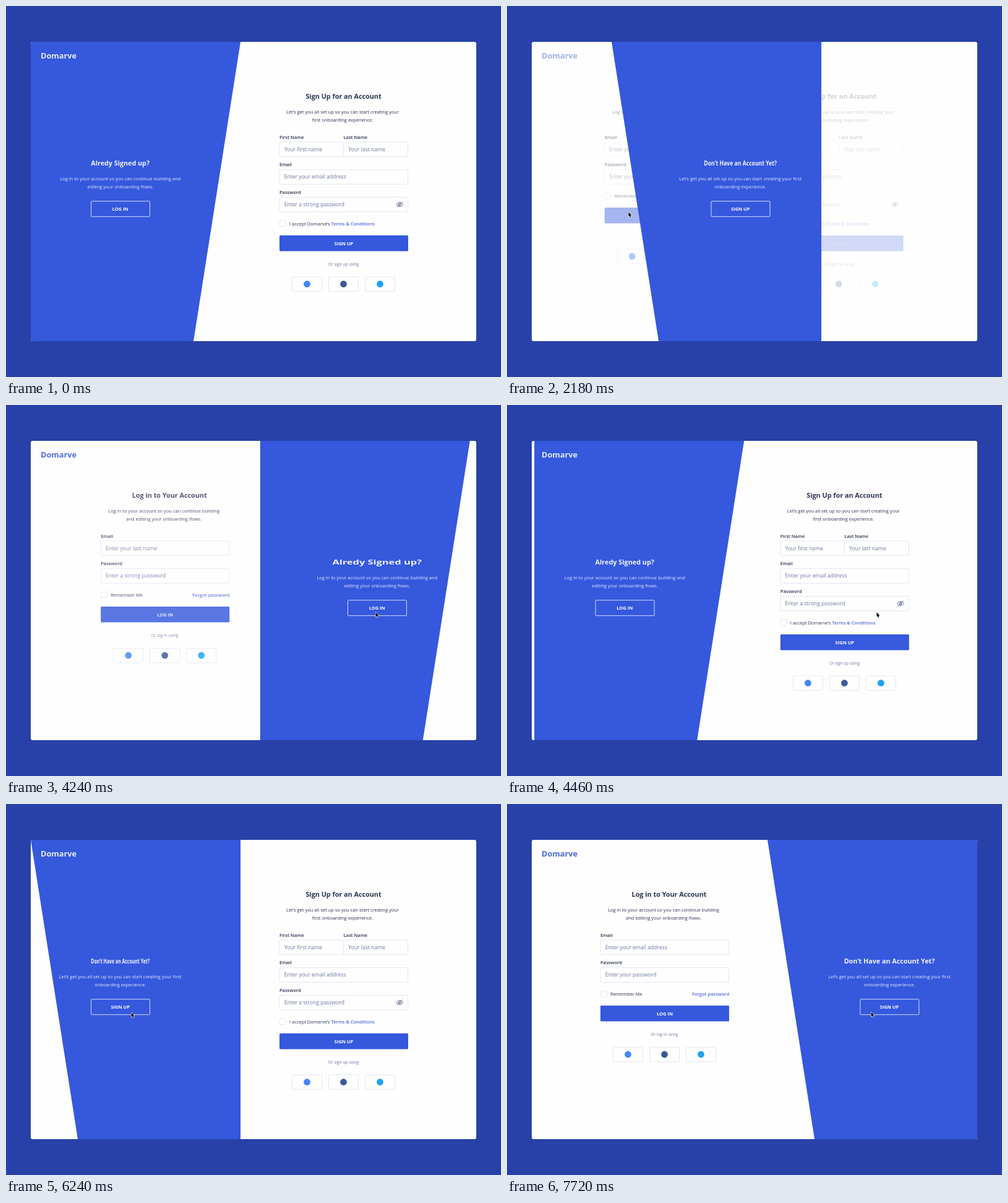
Write an HTML page with a canvas that moves like this. It is 800x600 px and loops after 8 s.

```html
<!DOCTYPE html>
<html lang="en">
<head>
<meta charset="utf-8">
<title>Sign up / log in</title>
<style>
  html, body { margin: 0; width: 100%; height: 100%; overflow: hidden; background: #2841a8; }
  canvas { display: block; width: 800px; height: 600px; }
</style>
</head>
<body>
<canvas id="stage" width="800" height="600"></canvas>
<script>
const ctx = document.getElementById('stage').getContext('2d');
const LOOP = 8000;
const BLUE = '#3558dd', INK = '#283250', HINT = '#6d779f', LINE = '#e3e6f2', LINK = '#4f69d8';
const SOCIAL = ['#4285f4', '#3b5998', '#1da1f2'];
const BRAND = 'Domarve';

// swap: content changes; go: springs start; right: panel ends on the right
const TURNS = [
  { swap: -5000, go: -5000, right: false },
  { swap: 2060, go: 2095, right: true },
  { swap: 4230, go: 4221, right: false },
  { swap: 6220, go: 6241, right: true }
];

// Pointer path: time, x, y
const PATH = [
  [240, 724, 50], [440, 560, 110], [640, 409, 189], [920, 409, 189],
  [1180, 260, 330], [1340, 205, 357], [1500, 196, 341], [1660, 196, 334],
  [1820, 196, 334], [1840, 196, 333], [2440, 196, 333], [2640, 265, 340],
  [2880, 432, 344], [3400, 597, 335], [4720, 597, 335], [5060, 466, 352],
  [5260, 272, 355], [5860, 202, 338], [5880, 202, 338], [5900, 202, 337],
  [6640, 202, 337], [7040, 430, 346], [7720, 588, 336]
];

const PANELS = {
  left: {
    shape: [[0, 0], [339, 0], [263, 484], [0, 484]],
    title: 'Alredy Signed up?',
    lines: ['Log in to your account so you can continue building and', 'editing your onboarding flows.'],
    button: 'LOG IN'
  },
  right: {
    shape: [[0, 0], [339, 0], [339, 484], [76, 484]],
    title: 'Don’t Have an Account Yet?',
    lines: ['Let’s get you all set up so you can start creating your first', 'onboarding experience.'],
    button: 'SIGN UP'
  }
};

const clamp = v => Math.max(0, Math.min(1, v));
const mix = (a, b, p) => a + (b - a) * p;

function spring(ms, tension, friction) {
  if (ms <= 0) return 0;
  const t = ms / 1000, a = friction / 2, b = Math.sqrt(tension - a * a);
  return 1 - Math.exp(-a * t) * (Math.cos(b * t) + a / b * Math.sin(b * t));
}

function font(size, weight = 400) {
  ctx.font = `${weight} ${size}px "Open Sans", "Noto Sans", sans-serif`;
}

// y is the middle of the capitals
function text(str, x, y, size, color, weight = 400, align = 'left') {
  font(size, weight);
  ctx.textAlign = align;
  ctx.fillStyle = color;
  ctx.fillText(str, x, y + size * 0.36);
}

function box(x, y, w, h, { fill, stroke, r = 1.5 }) {
  ctx.beginPath();
  ctx.roundRect(x, y, w, h, r);
  if (fill) { ctx.fillStyle = fill; ctx.fill(); }
  if (stroke) { ctx.strokeStyle = stroke; ctx.lineWidth = 1; ctx.stroke(); }
}

function field(label, hint, x, y, w = 207.5) {
  text(label, x, y - 8, 7.5, INK, 600);
  box(x, y, w, 23.5, { stroke: LINE });
  text(hint, x + 7.7, y + 11.7, 8.6, HINT);
}

function heading(title, titleX, lines, x) {
  text(title, titleX, 146, 10.8, INK, 700, 'center');
  lines.forEach((s, i) => text(s, x, 171 + i * 13.3, 7.5, INK, 400, 'center'));
}

function submit(label, x, y) {
  box(x, y, 208, 25.5, { fill: BLUE });
  text(label, x + 104, y + 13, 7.5, '#fff', 700, 'center');
}

function socials(label, x, y) {
  text(label, x + 103.5, y - 20.5, 6.5, HINT, 400, 'center');
  SOCIAL.forEach((color, i) => {
    const left = x + 20.5 + i * 59;
    box(left, y, 48, 23.5, { stroke: LINE });
    ctx.beginPath();
    ctx.arc(left + 24, y + 11.7, 5.4, 0, 7);
    ctx.fillStyle = color;
    ctx.fill();
  });
}

function eye(x, y) {
  ctx.strokeStyle = '#5c668f';
  ctx.lineWidth = 1;
  ctx.beginPath();
  ctx.moveTo(x - 5.5, y);
  ctx.quadraticCurveTo(x, y - 7, x + 5.5, y);
  ctx.quadraticCurveTo(x, y + 7, x - 5.5, y);
  ctx.moveTo(x + 1.8, y);
  ctx.arc(x, y, 1.8, 0, 7);
  ctx.moveTo(x - 4.5, y + 4.3);
  ctx.lineTo(x + 4.5, y - 4.3);
  ctx.stroke();
}

function signUpForm() {
  const x = 442;
  heading('Sign Up for an Account', 545.5,
    ['Let’s get you all set up so you can start creating your', 'first onboarding experience.'], 544);
  field('First Name', 'Your first name', x, 220, 103.5);
  field('Last Name', 'Your last name', 545.5, 220, 104);
  field('Email', 'Enter your email address', x, 264.7);
  field('Password', 'Enter a strong password', x, 309.3);
  eye(636.3, 321);
  box(x + 0.3, 346.7, 10, 10, { stroke: LINE });
  const terms = `I accept ${BRAND}’s `;
  text(terms, 458, 352, 7.5, INK);
  text('Terms & Conditions', 458 + ctx.measureText(terms).width, 352, 7.5, LINK, 600);
  submit('SIGN UP', x, 371);
  socials('Or sign up using', x, 438);
}

function logInForm(leaving) {
  const x = 151;
  heading('Log in to Your Account', 262,
    ['Log in to your account so you can continue building', 'and editing your onboarding flows.'], 253);
  field('Email', leaving ? 'Enter your last name' : 'Enter your email address', x, 220);
  field('Password', leaving ? 'Enter a strong password' : 'Enter your password', x, 264.7);
  box(x + 0.3, 302.2, 10, 10, { stroke: LINE });
  text('Remember Me', 167, 307.5, 7.5, INK);
  text('Forgot password', 359.3, 307.5, 7.5, LINK, 600, 'right');
  submit('LOG IN', x, 326);
  socials('Or log in using', x, 393.3);
}

function fade(draw, alpha, dx) {
  if (alpha <= 0) return;
  ctx.save();
  ctx.globalAlpha = alpha;
  ctx.translate(dx * (1 - alpha), 0);
  draw();
  ctx.restore();
}

function titleWidth(panel) {
  font(10.75, 700);
  return ctx.measureText(panel.title).width;
}

function drawPanel(panel, shapePos, textPos) {
  const x = 40 + 381 * shapePos;
  ctx.beginPath();
  panel.shape.forEach(([px, py]) => ctx.lineTo(x + px, 58 + py));
  ctx.fillStyle = BLUE;
  ctx.fill();

  // the title's width morphs between both captions
  const width = mix(titleWidth(PANELS.left), titleWidth(PANELS.right), textPos);
  ctx.save();
  ctx.translate(mix(184.7, 618, textPos), 0);
  ctx.save();
  ctx.scale(width / titleWidth(panel), 1);
  text(panel.title, 0, 254, 10.75, '#f1f3fd', 700, 'center');
  ctx.restore();
  panel.lines.forEach((s, i) => text(s, 0, 279.3 + i * 13.3, 7.5, '#e6eafb', 400, 'center'));
  box(-47.2, 315.7, 95, 25, { stroke: '#d5dcf7', r: 1 });
  text(panel.button, 0, 328.5, 7.5, '#fff', 700, 'center');
  ctx.restore();
}

function slope(i, axis) {
  const prev = PATH[i - 1], at = PATH[i], next = PATH[i + 1];
  if (!prev || !next || prev[axis] === at[axis] || next[axis] === at[axis]) return 0;
  return (next[axis] - prev[axis]) / (next[0] - prev[0]);
}

function pointerAt(t, axis) {
  const last = PATH.length - 1;
  if (t >= PATH[last][0]) return PATH[last][axis];
  const i = PATH.findIndex(p => p[0] > t) - 1;
  const a = PATH[i], b = PATH[i + 1], span = b[0] - a[0];
  const u = (t - a[0]) / span, v = 1 - u;
  return a[axis] * (1 + 2 * u) * v * v + b[axis] * u * u * (3 - 2 * u)
    + span * (slope(i, axis) * u * v * v - slope(i + 1, axis) * u * u * v);
}

function drawPointer(t) {
  if (t < PATH[0][0]) return;
  const x = pointerAt(t, 1), y = pointerAt(t, 2);
  ctx.beginPath();
  [[0.5, 0.3], [0.5, 7.6], [2.1, 6.2], [3.3, 9], [4.5, 8.5], [3.4, 5.8], [5.6, 5.7]]
    .forEach(([px, py]) => ctx.lineTo(x + px, y + py));
  ctx.closePath();
  ctx.lineJoin = 'round';
  ctx.lineWidth = 1.2;
  ctx.strokeStyle = '#fff';
  ctx.stroke();
  ctx.fillStyle = '#000';
  ctx.fill();
}

function draw(t) {
  const turn = TURNS.filter(s => s.swap <= t).pop();
  const { right } = turn;
  const shape = spring(t - turn.go, 150, 16);
  const move = spring(t - turn.go, 250, 25);
  const textPos = right ? move : 1 - move;
  const enter = clamp(move);
  const leave = clamp(1 - (t - turn.go) / 110);

  ctx.fillStyle = '#2841a8';
  ctx.fillRect(0, 0, 800, 600);
  ctx.save();
  ctx.beginPath();
  ctx.roundRect(40, 58, 720, 484, 3);
  ctx.clip();
  ctx.fillStyle = '#fefefe';
  ctx.fillRect(40, 58, 720, 484);

  fade(signUpForm, right ? leave : enter, -12);
  fade(() => logInForm(!right), right ? enter : leave, 12);
  drawPanel(right ? PANELS.right : PANELS.left, right ? shape : 1 - shape, textPos);

  const p = clamp(textPos);
  const logo = [[230, 74], [234, 104], [250, 224]].map(([a, b]) => Math.round(mix(a, b, p)));
  text(BRAND, 56, 80.5, 12.75, `rgb(${logo})`, 700);
  drawPointer(t);
  ctx.restore();
}

const start = performance.now();
function tick() {
  draw((performance.now() - start) % LOOP);
  requestAnimationFrame(tick);
}
tick();
</script>
</body>
</html>
```
